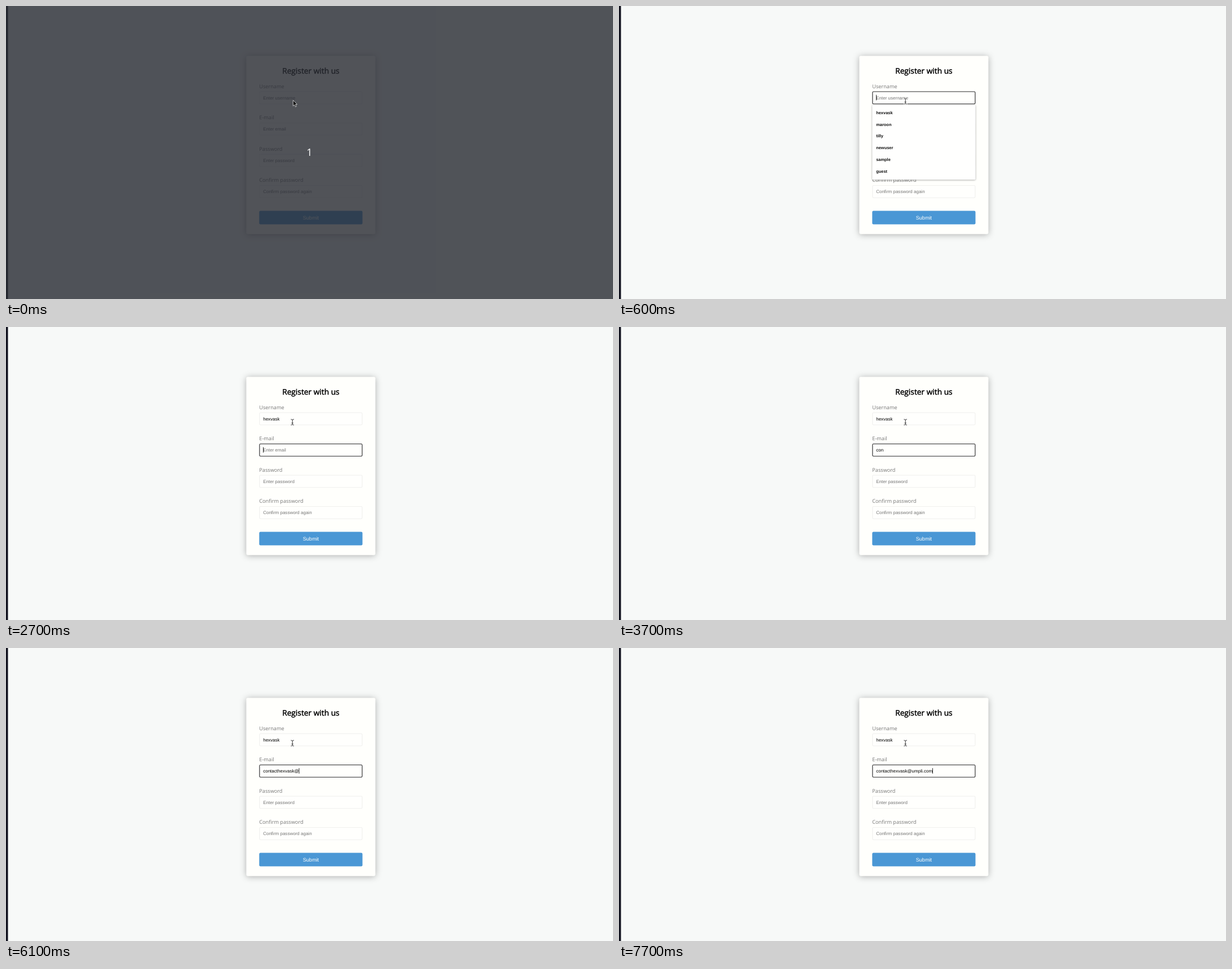
Animation, 1077 px wide and 520 px high, one loop 8000 ms. Source, as an HTML page:

```html
<!DOCTYPE html>
<html lang="en">
<head>
<meta charset="utf-8">
<title>Register form</title>
<style>
  html, body { margin: 0; width: 100%; height: 100%; overflow: hidden; background: #f7f9f8; }
  svg { display: block; width: 100vw; height: 100vh; }
  text { text-rendering: geometricPrecision; white-space: pre; }
  .title, .label, .count { font-family: "Open Sans", "Noto Sans", sans-serif; }
  .title { font-size: 24px; stroke: #000; stroke-width: .8px; text-anchor: middle; }
  .label { font-size: 16px; fill: #777; }
  .value, .button, .row { font-family: "Liberation Sans", Arial, sans-serif; font-kerning: none; }
  .value { font-size: 14px; }
  .empty { fill: #757575; }
  .button { font-size: 16px; fill: #fffffc; text-anchor: middle; }
  .row { font-size: 13px; font-weight: bold; fill: #111; }
  .count { font-size: 18px; fill: #fff; text-anchor: middle; }
  .box { fill: #fffffd; stroke: #f0f0ee; stroke-width: 2px; }
  .box.focus { stroke: #2a2a2c; }
  .card { fill: #fffffc; filter: drop-shadow(0 2px 10px rgba(0, 0, 0, .3)); }
  #list rect { fill: #fffffe; filter: drop-shadow(0 1px 3px rgba(0, 0, 0, .4)); }
</style>
</head>
<body>
<svg viewBox="0 0 1077 520" preserveAspectRatio="none">
  <rect width="1077" height="520" fill="#f7f9f8"/>
  <rect width="3.5" height="520" fill="#12131f"/>
  <g transform="translate(426.4 88.4) scale(.5725)">
    <rect class="card" width="400" height="552.5" rx="5"/>
    <text class="title" x="200" y="56">Register with us</text>
    <g id="fields"></g>
    <rect x="40" y="480.5" width="320" height="42" rx="4" fill="#4a97d5"/>
    <text class="button" x="200" y="507">Submit</text>
    <g id="list" transform="translate(40 110)">
      <rect y="42" width="320" rx="3"/>
    </g>
  </g>
  <g id="beam" fill="none" stroke-linecap="round">
    <path id="stem" d="M-2.4-5Q-.4-5 0-4Q.4-5 2.4-5M0-4V4M-2.4 5Q-.4 5 0 4Q.4 5 2.4 5M-1.2 1.6H1.2" stroke="#fff" stroke-width="2"/>
    <use href="#stem" style="stroke:#333;stroke-width:1"/>
    <path d="M-2.4-5Q-.4-5 0-4Q.4-5 2.4-5M0-4V4M-2.4 5Q-.4 5 0 4Q.4 5 2.4 5M-1.2 1.6H1.2" stroke="#333" stroke-width="1"/>
  </g>
  <g id="veil">
    <rect width="1077" height="520" fill="rgb(41,44,51)" fill-opacity=".81"/>
    <text class="count" x="538.5" y="265.6">1</text>
    <path d="M509.4 167.2V177.4L511.8 175.2L513.5 179L515.2 178.2L513.6 174.6H516.6Z" fill="#080808" stroke="#e4e4e4" stroke-width=".8" stroke-linejoin="round"/>
  </g>
</svg>
<script>
const LOOP = 8000, STEP = 100;
const NS = "http://www.w3.org/2000/svg";
const $ = id => document.getElementById(id);

const USER = "hexvask";
const MAIL = "contact" + USER + "@umpli.com";
const ROWS = [USER, "maroon", "tilly", "newuser", "sample", "guest"];

// [time, letters typed so far]
const USER_KEYS = [[1100, 2], [1400, 4], [1500, 6], [1700, 7]];
const MAIL_KEYS = [
  [2800, 1], [2900, 2], [3100, 3], [4000, 5], [4200, 6], [4300, 7],
  [5300, 8], [5400, 9], [5500, 10], [5600, 11], [5700, 12], [5800, 14],
  [6100, 15], [6400, 16], [6600, 17], [6700, 18], [6800, 19],
  [7000, 20], [7200, 21], [7400, 22], [7500, 23], [7700, 24]
];
const CARET_OFF = [[0, 400], [2300, 2700], [3700, 4000], [5000, 5300]];
const LIST_FADE = [[500, .5], [600, 1], [1800, .6], [1900, .25], [2000, 0]];

function add(parent, tag, attrs, text = "") {
  const el = document.createElementNS(NS, tag);
  for (const key in attrs) el.setAttribute(key, attrs[key]);
  el.textContent = text;
  parent.append(el);
  return el;
}

function makeField(label, hint, i) {
  const g = add($("fields"), "g", { transform: `translate(40 ${83 + 97 * i})` });
  add(g, "text", { class: "label", y: 17 }, label);
  const box = add(g, "rect", { class: "box", x: 1, y: 28, width: 318, height: 38, rx: 3 });
  const value = add(g, "text", { class: "value empty", x: 12, y: 52 }, hint);
  const caret = add(g, "rect", { y: 38, width: 1.5, height: 17, visibility: "hidden" });
  return { hint, box, value, caret };
}

const fields = [
  ["Username", "Enter username"],
  ["E-mail", "Enter email"],
  ["Password", "Enter password"],
  ["Confirm password", "Confirm password again"]
].map(([label, hint], i) => makeField(label, hint, i));

const rows = ROWS.map((name, i) =>
  add($("list"), "text", { class: "row", x: 12, y: 71 + 36.2 * i }, name));

// Value of the last key at or before t
const at = (keys, t) => keys.reduce((v, [time, next]) => t >= time ? next : v, 0);

function showField(field, text, focused, caretOn) {
  field.value.textContent = text || field.hint;
  field.value.classList.toggle("empty", !text);
  field.box.classList.toggle("focus", focused);
  const on = focused && caretOn;
  field.caret.setAttribute("visibility", on ? "visible" : "hidden");
  if (on) field.caret.setAttribute("x", 12 + (text ? field.value.getComputedTextLength() : 0));
}

function showList(t) {
  const count = t < 1100 ? ROWS.length : 1;
  $("list").setAttribute("opacity", at(LIST_FADE, t));
  $("list").firstElementChild.setAttribute("height", 51 + 36.2 * (count - 1));
  rows.forEach((row, i) => row.setAttribute("display", i < count ? "inline" : "none"));
}

function render(t) {
  const caretOn = !CARET_OFF.some(([from, to]) => t >= from && t < to);
  showField(fields[0], USER.slice(0, at(USER_KEYS, t)), t >= 400 && t < 2600, caretOn);
  showField(fields[1], MAIL.slice(0, at(MAIL_KEYS, t)), t >= 2600, caretOn);
  showList(t);
  $("veil").setAttribute("display", t < 100 ? "inline" : "none");
  $("beam").setAttribute("display", t < 100 ? "none" : "inline");
  $("beam").setAttribute("transform", t < 400 ? "translate(508.7 168.3)" : "translate(508.2 168.9)");
}

let start, last;
function tick(now) {
  start ??= now;
  const t = Math.floor((now - start) % LOOP / STEP) * STEP;
  if (t !== last) render(last = t);
  requestAnimationFrame(tick);
}
render(0);
requestAnimationFrame(tick);
</script>
</body>
</html>
```
